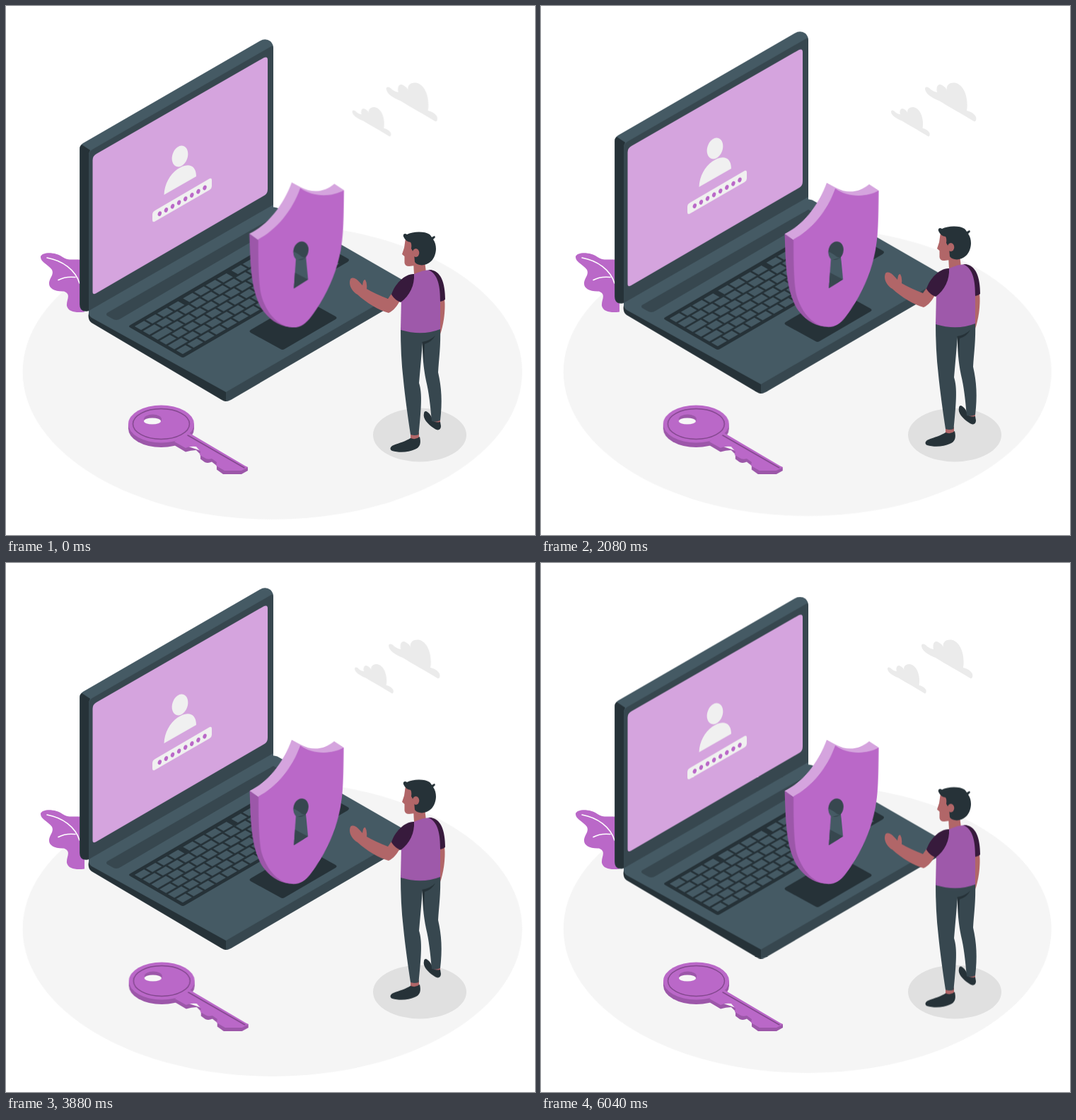
An HTML page that plays this animation: 748 px wide and 748 px high, repeating every 6080 ms.

```html
<!DOCTYPE html>
<html lang="en">
<head>
<meta charset="utf-8">
<title>Secure laptop</title>
<style>
  html, body { margin: 0; height: 100%; overflow: hidden; background: #fff; }
  svg { display: block; width: 100vw; height: 100vh; }

  /* One loop is 6.08 s: long moves run once, short ones four times. */
  .long, .short { animation: 6.08s linear -.035s infinite; }
  .short { animation-duration: 1.52s; }
  .beat { animation-name: beat; }
  .shake { animation-name: shake; }
  .float { animation-name: float; }
  .hover { animation-name: hover; }
  #floor { transform-origin: 376.7px 517.3px; }
  #shield { transform-origin: 411px 351.5px; }

  @keyframes beat {
    0%, 30%, 40%, 60%, 100% { transform: scale(1); }
    10%, 50% { transform: scale(1.1); }
  }
  @keyframes shake {
    0%, 100% { transform: translateX(0); }
    10%, 90% { transform: translateX(-1.5px); }
    20%, 80% { transform: translateX(3px); }
    30%, 50%, 70% { transform: translateX(-6px); }
    40%, 60% { transform: translateX(6px); }
  }
  @keyframes float {
    0%, 100% { transform: translateY(.6px); }
    50% { transform: translateY(-14.4px); }
  }
  /* Late start, so the loop ends with a small jump. */
  @keyframes hover {
    0%, 8.333% { transform: translateY(0); }
    58.333% { transform: translateY(-15px); }
    100% { transform: translateY(-2.5px); }
  }

  .ink { fill: #263238; }
  .slate { fill: #37474f; }
  .steel { fill: #455a64; }
  .violet { fill: #ba68c8; }
  .plum { fill: #9c57a9; }
  .lilac { fill: #d5a4de; }
  .skin { fill: #b16668; }
  .sleeve { fill: #371a3c; }
  .pale { fill: #f0f0f0; }
  .line { fill: none; stroke-linecap: round; }
</style>
</head>
<body>
<svg viewBox="0 0 748 748">
  <ellipse id="floor" class="short beat" cx="376.7" cy="517.3" rx="345" ry="203.8" fill="#f5f5f5"/>
  <ellipse cx="585" cy="606.5" rx="66" ry="38" fill="#e0e0e0"/>

  <g class="short shake" fill="#ebebeb">
    <path id="cloud" d="M538 117C538 113 543 114 546 118Q550 121 555 122C553 114 557 109 562 112Q568 115 569 120C567 112 573 107 582 109C592 112 600 128 597 148C602 149 608 152 610 157C611 162 609 164 607 163C588 151 572 143 558 134C548 130 538 124 538 117Z"/>
    <use href="#cloud" transform="translate(82.7 60.9) scale(.757)"/>
  </g>

  <path class="violet" d="M49 354C52 347 71 348 80 355C88 361 98 357 111 359V432.500C100 434 88 433 86 424C85 415 93 408 82 403.500C68 404 60 399 61 391C62 384 68 380 65 373C59 365 48 362 49 354Z"/>
  <path class="line" stroke="#fff" stroke-width="1.6" d="M58 356C80 360 98 373 104 392M74 387.500Q84 382 98 383.500"/>

  <g class="short float">
    <path class="steel" d="M117 437V424L378 274V284.500Q383 284 388 288L560 387Q568 391 566 400V412L316 557Q312 560 307 557L121 447Q117 444 117 437Z"/>
    <path class="slate" d="M311 546L566 398V412L318 557Q314 559 311 559Z"/>
    <path class="ink" d="M117 434Q118 440 123 442L311 546V559Q308 559 305 557L121 448Q116.500 445 116.500 438Z"/>
    <path class="slate" d="M143 434L378 299L392 307L162 442Q156 446 150 442L143 438Q141 436 143 434Z"/>
    <path class="ink" d="M176 451L406 317Q409 315 412 317L483 357Q487 359 483 362L253 496Q250 498 247 496L176 455Q172 453 176 451Z"/>
    <g id="keys" class="steel"></g>
    <path class="ink" d="M346 458L421 414L466 439Q469 441 466 443L394 485Q391 487 388 485L346 462Q343 460 346 458Z"/>

    <path class="steel" d="M104.300 202Q104.300 197 109 194L359 49.500Q367 45 374 50Q378 54 378 60V280L117 431Q104.300 434 104.300 422Z"/>
    <path class="ink" d="M104.300 202Q104.300 198 107 196L119 204Q117 207 117 212V431Q104.300 434 104.300 422Z"/>
    <path class="slate" d="M117 212Q117 206 122 203L377 56Q378 58 378 62V281L117 431Z"/>
    <path class="lilac" d="M122.500 218Q122.500 212 128 209L365 73Q370 71 370 76V259Q370 265 366 267.500L127 406.500Q122.500 409 122.500 404Z"/>
    <ellipse class="pale" cx="246" cy="212.500" rx="10.800" ry="15.300" transform="rotate(19 246 212.500)"/>
    <path class="pale" d="M223.500 267C224 252 232 238 242 231C254 222 269 222 269 241Z"/>
    <path class="pale" d="M207 295Q207 291 211 289L288 244Q291 243 291 246V255Q291 258 288 260L210 305Q207 306 207 303Z"/>
    <g id="dots" class="violet"></g>
  </g>

  <g id="shield" class="long beat">
    <path class="plum" d="M344.500 322L358 331L365 415L402 453.500C384 452 371 441 362 428C346 400 346 365 344.500 322Z"/>
    <path class="lilac" d="M344.500 322C369 311 392 283 404 250L417 257C434 266 451 263 464 252L477.500 261L440 300L357 331Z"/>
    <path class="violet" d="M357 330C382 317 405 290 416 258C434 271 460 271 477.500 261C477 300 477 322 473 345C468 372 458 397 444 420C435 434 428 445 420 450Q412 455 402 453.500C383 451 367 431 361 408C357 390 357 350 357 330Z"/>
    <path class="steel" d="M410 356L407 399L427 386.500L423.500 350Z"/>
    <path class="slate" d="M408.500 377L427 386.500L407 399Z"/>
    <ellipse class="slate" cx="417" cy="346" rx="10.500" ry="13.200" transform="rotate(14 417 346)"/>
    <path class="steel" d="M406.500 347Q413 350 419 355L423 356L411 359Q406 355 406.500 347Z"/>
  </g>

  <g class="long hover">
    <path class="skin" d="M614 416L620 414C622 432 618 453 614 464L612 460Z"/>
    <path class="skin" d="M572 603H584V613Q578 617 572 613ZM602 584L614 582V590Q607 592 602 588Z"/>
    <path class="ink" d="M572 611C566 615 556 618 548 621C543 623 542 627 546 629C556 632 570 631 578 627C586 624 587 618 585 609Q579 614 572 611Z"/>
    <path class="ink" d="M591 576C589 583 596 591 605 597C610 601 615 600 615 594L614 588Q606 590 603 585C602 578 592 568 591 576Z"/>
    <path class="slate" d="M558 455H614C615 480 612 500 611 518C616 540 617 560 614 586Q608 589 602 587C600 565 598 546 594 530C590 510 589 495 589 476L584 533C589 548 587 570 583.500 606Q578 608 572 606C568 580 564 550 562 530C559 505 558 480 558 455Z"/>
    <path class="ink" d="M588.500 475Q600 473 607 466Q602 475 592 478L591 505Z"/>
    <path class="skin" d="M576 362L592 360L594 377L585 382L577 379Z"/>
    <path class="skin" d="M565 328L563 342L560 351L563.500 354V363Q564 368 570 368L578 367L586 355L580 328Z"/>
    <path class="ink" d="M562 326C561 322 564 321 567 323C575 318.500 592 318 599 323Q601 325 602 327L606 325L607 327L604 330C611 340 608 354 601 361C594 368 582 368 578 362L577 350L573 343Q574 336 572 334Q565 333 562 326Z"/>
    <ellipse class="skin" cx="579.500" cy="349" rx="4.800" ry="6"/>
    <path fill="#9e59aa" d="M577 379Q590 373 601 373C611 376 614 388 614 402V457Q588 467 558 458L559 413Z"/>
    <path class="sleeve" d="M597 373C615 372 621 392 621 415Q617 418 614 418C614 396 611 379 597 373Z"/>
    <path class="skin" d="M487 386C484 393 488 403 497 408C510 420 527 430 541 434C548 431 553 424 557 417L545 407L540 414C528 409 518 405 510 400Q511 392 508 387C505 387 505 390 504 395C499 389 492 381 487 386Z"/>
    <path class="sleeve" d="M577 379C564 378 549 394 545 408Q550 416 558 419C571 410 578 394 577 379Z"/>
  </g>

  <g class="long shake">
    <g class="plum">
      <ellipse cx="219.500" cy="597.500" rx="46.500" ry="26.500"/>
      <path d="M173 591H266V598H173Z"/>
      <path d="M238 616V621L254 630.500Q261 628 269 628L275 634V640.500L281 645Q286 647 291 644.500L298 650V655.500L307 662H333L342 657V652Z"/>
    </g>
    <g class="violet">
      <ellipse cx="219.500" cy="591" rx="46.500" ry="26.500"/>
      <path d="M258 603L342 652.500L333 657H309L297 650L298 645L291 640Q285 642 281 639L274 635L275 630L269 623Q260 622 254 625L238 616Z"/>
    </g>
    <path class="line" stroke="#84488f" stroke-width="1.500" d="M257 607L337 653"/>
    <ellipse class="line" cx="219.500" cy="591" rx="40" ry="21.500" stroke="#84488f" stroke-width="1.500"/>
    <ellipse class="plum" cx="207.500" cy="584.500" rx="12.500" ry="7"/>
    <ellipse cx="207" cy="587" rx="12" ry="4.500" fill="#f7f7f7"/>
  </g>
</svg>
<script>
  const shape = (parent, tag, attrs) => {
    const el = document.createElementNS('http://www.w3.org/2000/svg', tag);
    for (const name in attrs) el.setAttribute(name, attrs[name]);
    document.getElementById(parent).append(el);
  };

  // Keyboard plane: u runs along the rows, v runs towards the front.
  const spot = (u, v) =>
    `${(174 + .866 * (u + v)).toFixed(1)},${(453 + .5 * (v - u)).toFixed(1)}`;
  const cap = (u, v, w, h) => shape('keys', 'polygon', {
    points: [spot(u, v), spot(u + w, v), spot(u + w, v + h), spot(u, v + h)].join(' ')
  });

  const pitch = 13.6, start = 4.5, end = 266;
  for (let row = 0; row < 6; row++) {
    const v = start + row * pitch;
    let u = start, w = row ? 14 + (row * 5) % 12 : 15.5;
    for (let col = 1; u < end - 5; col++) {
      cap(u, v, Math.min(w, end - u), 10.6);
      // The top row is split into groups of four.
      u += w + (row === 0 && col % 4 === 0 ? 8 : 3);
      w = 15.5;
    }
  }

  for (let i = 0; i < 8; i++) {
    const x = 217.3 + i * 9.1, y = 293.7 - i * 5.25;
    shape('dots', 'ellipse', {
      cx: x, cy: y, rx: 2.5, ry: 3.5, transform: `rotate(22 ${x} ${y})`
    });
  }
</script>
</body>
</html>
```
